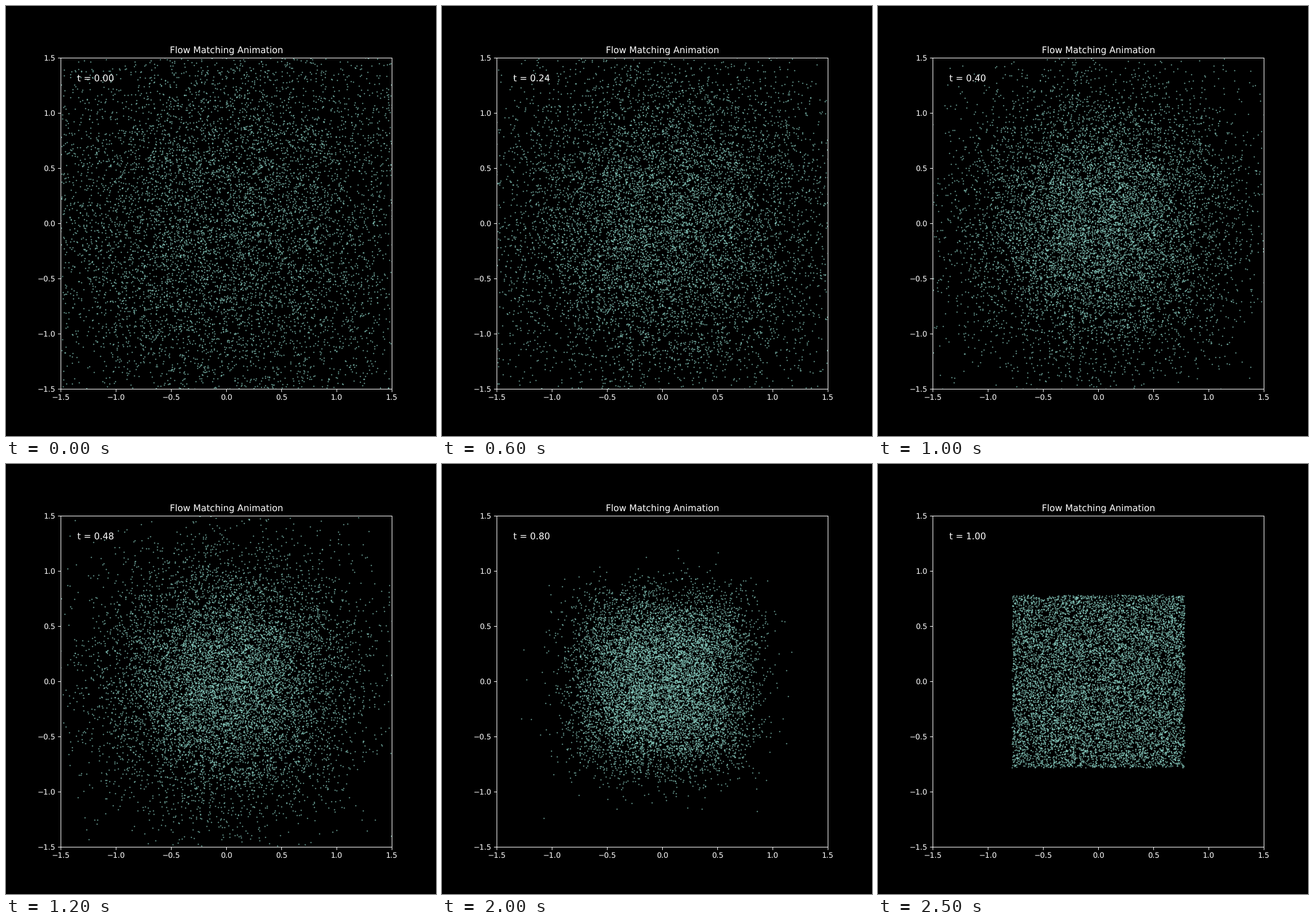
Write a matplotlib script that moves like this. It is 748 px wide and 748 px high and loops after 2.55 s.

```python
import matplotlib.pyplot as plt
import numpy as np
from matplotlib.animation import FuncAnimation

STEPS = 50
COUNT = 10000
HALF = 0.79  # half side of the square the points settle into


def expected_end(x, t):
    """Mean end position along one axis for points now at x."""
    grid = np.linspace(-5, 5, 1001)
    ends = np.linspace(-HALF, HALF, 401)
    logw = -0.5 * ((grid[:, None] - t * ends) / (1 - t)) ** 2
    w = np.exp(logw - logw.max(axis=1, keepdims=True))
    return np.interp(x, grid, w @ ends / w.sum(axis=1))


def flow(start):
    """Euler steps of the flow from a normal cloud to an even square."""
    path = [start]
    for k in range(STEPS):
        t = k / STEPS
        x = path[-1]
        path.append(x + (expected_end(x, t) - x) / (1 - t) / STEPS)
    return path


rng = np.random.default_rng(4)
path = flow(rng.standard_normal((COUNT, 2)))

plt.style.use("dark_background")
plt.rcParams.update({"font.family": "DejaVu Sans", "text.hinting": "none"})
fig, ax = plt.subplots(figsize=(8, 8), dpi=93.5)
ax.set(xlim=(-1.5, 1.5), ylim=(-1.5, 1.5), aspect="equal")
ax.set_title("Flow Matching Animation")
dots, = ax.plot([], [], ".", color="#8dd3c7", markersize=1, zorder=1)
label = ax.text(-1.35, 1.28, "", fontsize=12, color="white")


def update(i):
    dots.set_data(path[i][:, 0], path[i][:, 1])
    label.set_text(f"t = {i / STEPS:.2f}")
    return dots, label


anim = FuncAnimation(fig, update, frames=STEPS + 1, interval=50,
                     repeat=True, repeat_delay=0)
plt.show()
```
